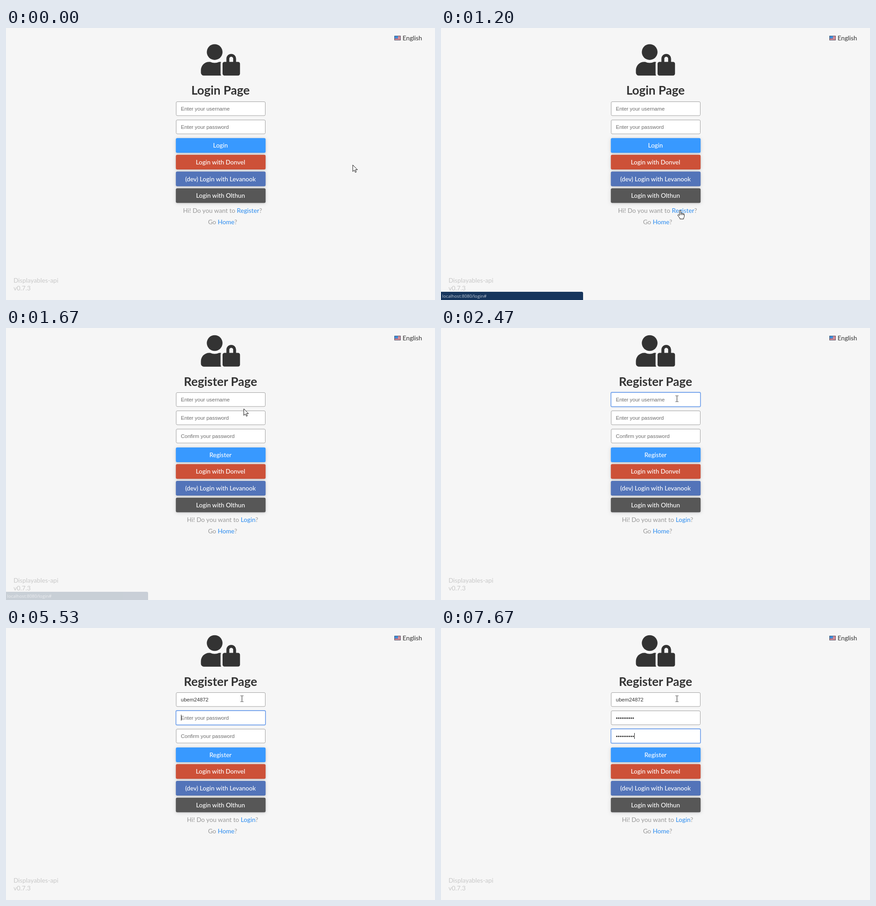
Write an HTML page that moves like this. It is 939 px wide and 596 px high and loops after 8 s.

```html
<!DOCTYPE html>
<html lang="en">
<head>
<meta charset="utf-8">
<title>Register form</title>
<style>
html, body { margin: 0; width: 100%; height: 100%; overflow: hidden; background: #f6f6f6; }
svg { display: block; width: 100vw; height: 100vh; }
text { font: 13.76px Lato, sans-serif; fill: #999; white-space: pre; }
.mid { text-anchor: middle; }
.title { font-size: 26.6px; font-weight: 700; fill: #333; }
.btn { font-size: 13.6px; font-weight: 500; fill: #fff; }
.link { fill: #2b8cf0; }
.version { fill: #c8c8c8; }
.field { font: 11.45px "Liberation Sans", Arial, sans-serif; fill: #333; }
.hint { fill: #6c6c6c; }
.status { font: 9.7px "Open Sans", sans-serif; fill: #c3ccd8; }
.shadow { filter: drop-shadow(0 1.7px 1.7px rgba(34, 36, 38, .12)) drop-shadow(0 1.7px 4.3px rgba(34, 36, 38, .15)); }
</style>
</head>
<body>
<svg viewBox="0 0 939 596">
  <g id="page"></g>
  <g>
    <rect x="850" y="17" width="14" height="10" fill="#e4e4ea"/>
    <path d="M850 17.8h14m-14 2.8h14m-14 2.8h14m-14 2.8h14" stroke="#c33a48" stroke-width="1.5"/>
    <rect x="850" y="17" width="8" height="6" fill="#3f8fdc"/>
    <rect x="850.5" y="17.5" width="13" height="9" fill="none" stroke="#33445a" stroke-opacity=".8"/>
    <text x="868" y="26.5" style="fill:#333">English</text>
    <text class="version" x="16.5" y="558.3">Displayables-api</text>
    <text class="version" x="16.5" y="575.3">v0.7.3</text>
  </g>
  <g id="status">
    <path d="M0 578H308a3 3 0 0 1 3 3V596H0Z" fill="#17365d"/>
    <text class="status" x="2.5" y="591">localhost:8080/login#</text>
  </g>
  <g id="cursor"></g>
</svg>
<script>
const LOOP = 8000, STEP = 200 / 3, SWITCH = 1270, FIELD_X = 382.8;
const $ = id => document.getElementById(id);

const fields = [
  { hint: 'Enter your username', text: 'ubem24872', focus: 1930,
    keys: [2730, 2800, 2930, 3130, 3470, 3530, 3730, 4130, 4270] },
  { hint: 'Enter your password', text: '•'.repeat(10), focus: 4530,
    keys: [5600, 5800, 5930, 6070, 6130, 6130, 6270, 6330, 6470, 6530] },
  { hint: 'Confirm your password', text: '•'.repeat(10), focus: 6670,
    keys: [6730, 6870, 7070, 7130, 7270, 7330, 7470, 7470, 7530, 7670] }
];

// Pointer path: time, x, y
const path = [
  [0, 759, 300], [70, 754, 304], [270, 690, 358], [470, 602, 418], [600, 545, 433],
  [740, 497, 421], [870, 506, 408], [1000, 520, 402], [1200, 523.5, 399.5],
  [1270, 526, 385.5], [1400, 527, 335], [1530, 524, 243], [1670, 520.5, 177],
  [1730, 518, 164], [1800, 516.5, 155]
];

const shapes = {
  arrow: '<path d="M0 0V14.5L3.4 11.4 5.6 16.4 7.8 15.5 5.7 10.6H10.3Z" fill="#fff" stroke="#111"/>',
  hand: '<path d="M-1.5 1.5a1.5 1.5 0 0 1 3 0V6.5q1.5-1 2.8.3 1.6-.6 2.6.6 2.1-.3 2.1 2V13q0 2-1.5 4V19H-.5V17.5L-5 11.5q-.6-2 1-2 1.2 0 2.5 2Z" fill="#fff" stroke="#111"/>' +
    '<path d="M1.5 6.5v4M4.3 7v3.5M6.9 7.5v3" stroke="#111"/>',
  beam: '<path d="M-3-6.5h2.2l.8.8.8-.8H3M0-5.7V5.7M-3 6.5h2.2l.8-.8.8.8H3" fill="none" stroke="#222"/>'
};

const label = (cls, x, y, s) => `<text class="${cls}" x="${x}" y="${y}">${s}</text>`;
const link = s => `<tspan class="link">${s}</tspan>?`;

const icon = y => `<g transform="translate(0 ${y})" fill="#333">
  <g transform="translate(426.6 0) scale(.1345)"><circle cx="224" cy="128" r="128"/>
  <path d="M320 320a63 63 0 0 1 8-30.5q-7-1.5-14.4-1.5h-16.7a174 174 0 0 1-145.8 0h-16.7A134.4 134.4 0 0 0 0 422.4V464a48 48 0 0 0 48 48h281a63.5 63.5 0 0 1-9-32Z"/></g>
  <rect x="474" y="38.8" width="38.2" height="30" rx="4.2"/>
  <path d="M485.6 41V31.8a7.4 7.4 0 0 1 14.8 0V41" fill="none" stroke="#333" stroke-width="6.4"/></g>`;

function fieldBox(f, y, t, focused) {
  const typed = f.text.slice(0, f.keys.filter(k => k <= t).length);
  const box = focused
    ? `x="372" y="${y}" width="196" height="31.5" rx="2.5" stroke="#79a6ec" stroke-width="1.8"`
    : `x="372.5" y="${y + .5}" width="195" height="30.5" rx="2.5" stroke="#a0a0a0"`;
  return `<rect ${box} fill="#fff"/>` +
    `<text class="field ${typed ? '' : 'hint'}" ${focused && typed ? 'id="typed"' : ''} x="${FIELD_X}" y="${y + 19.5}">${typed || f.hint}</text>`;
}

function drawPage(t) {
  const register = t >= SWITCH, top = register ? 0 : 19.7;
  const name = register ? 'Register' : 'Login', other = register ? 'Login' : 'Register';
  const shown = fields.slice(0, register ? 3 : 2);
  const active = fields.findLastIndex(f => f.focus <= t);
  const low = register ? 0 : -20.5;
  const buttons = [[name, '#3899ff'], ['Login with Donvel', '#cd5138'],
    ['(dev) Login with Levanook', '#5374b9'], ['Login with Olthun', '#575757']];
  return icon(15.8 + top) +
    label('title mid', 469.5, 126.5 + top, name + ' Page') +
    shown.map((f, i) => fieldBox(f, Math.round(141.1 + top + i * 40.15), t, i === active)).join('') +
    buttons.map(([s, color], i) => {
      const y = 261.7 + low + i * 36.65;
      return `<rect class="shadow" x="371.8" y="${y}" width="196.4" height="32.2" rx="3" fill="${color}"/>` +
        label('btn mid', 469.5, y + 21, s);
    }).join('') +
    label('mid', 474, 425.2 + low, 'Hi! Do you want to ' + link(other)) +
    label('mid', 474, 450.2 + low, 'Go ' + link('Home'));
}

function drawCaret(t) {
  const i = fields.findLastIndex(f => f.focus <= t);
  if (i < 0) return;
  const last = Math.max(...[fields[i].focus, ...fields[i].keys].filter(k => k <= t));
  if (Math.floor((t - last) / 500) % 2) return;
  const typed = $('typed');
  const x = Math.round(FIELD_X + (typed ? typed.getComputedTextLength() : 0));
  $('page').insertAdjacentHTML('beforeend',
    `<rect x="${x}" y="${150 + i * 40}" width="1" height="13" fill="#222"/>`);
}

function pointer(t) {
  const i = path.findIndex(p => p[0] > t);
  if (i < 0) return path[path.length - 1].slice(1);
  const [a, b] = [path[i - 1], path[i]], u = (t - a[0]) / (b[0] - a[0]);
  return [a[1] + (b[1] - a[1]) * u, a[2] + (b[2] - a[2]) * u];
}

function cursorKind(t, y) {
  if (t < SWITCH) return t >= 930 ? 'hand' : 'arrow';
  if (y > 262 && y < 404) return 'hand';
  return [141, 181, 221].some(top => y > top && y < top + 32) ? 'beam' : 'arrow';
}

const clamp = v => Math.max(0, Math.min(1, v));
let shownAt = -1;

function draw(now) {
  const step = Math.floor((now % LOOP + 4) / STEP) % (LOOP / STEP);
  const t = Math.round(step * STEP / 10) * 10;
  if (t !== shownAt) {
    shownAt = t;
    $('page').innerHTML = drawPage(t);
    drawCaret(t);
    const [x, y] = pointer(t);
    $('cursor').innerHTML = shapes[cursorKind(t, y)];
    $('cursor').setAttribute('transform', `translate(${x} ${y})`);
    $('status').setAttribute('opacity', Math.min(clamp((t - 910) / 120), clamp((1705 - t) / 175)));
  }
}

const start = performance.now();
(function tick() {
  draw(performance.now() - start);
  requestAnimationFrame(tick);
})();
</script>
</body>
</html>
```
